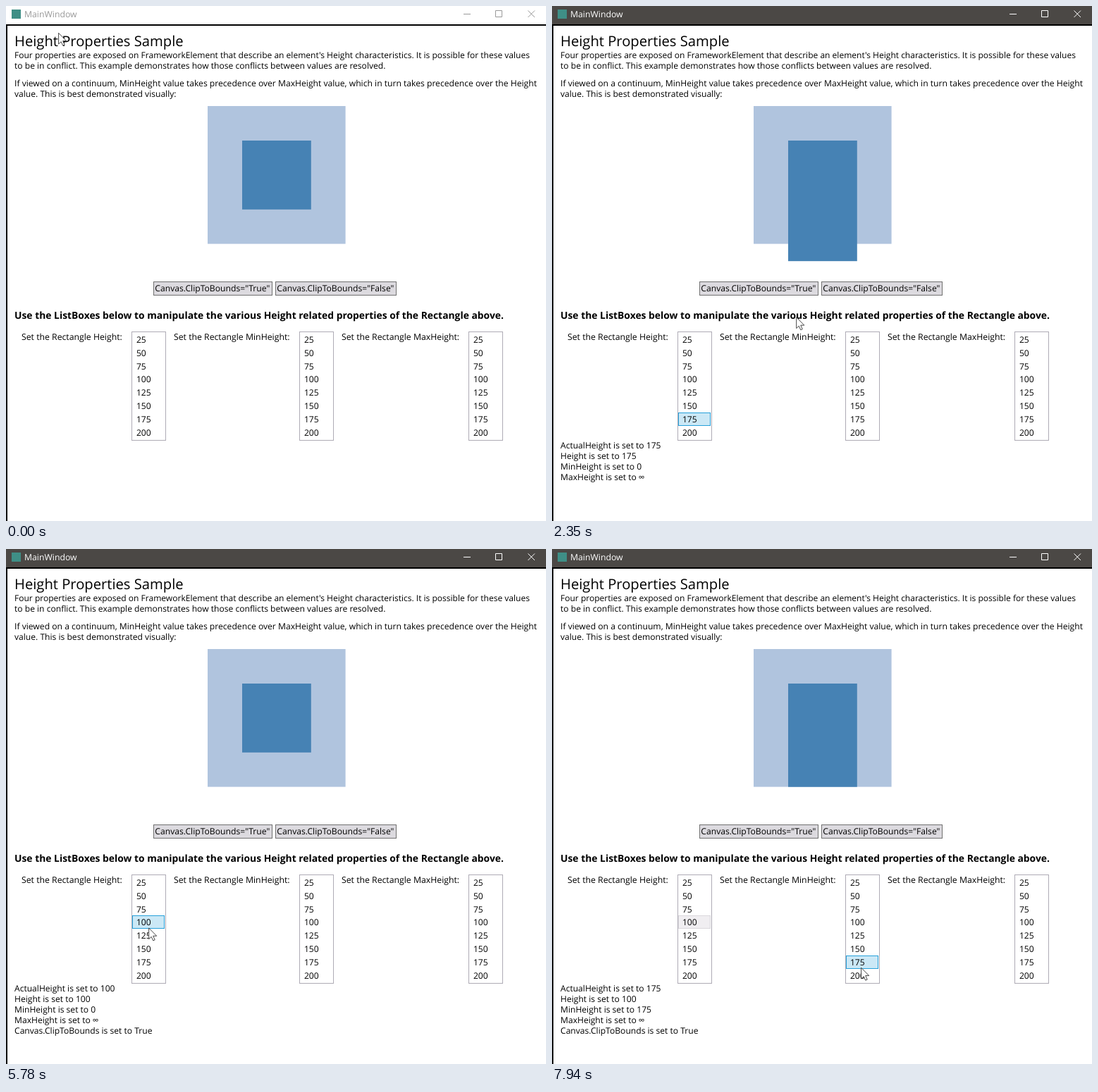
Recreate the animation shown at these times as an HTML page. Size 766 px wide and 731 px high, loop 8000 ms.

```html
<!DOCTYPE html>
<html lang="en">
<head>
<meta charset="utf-8">
<title>Height properties demo</title>
<style>
  html, body { margin: 0; width: 100%; height: 100%; overflow: hidden; background: #fff; }
  svg { display: block; width: 100vw; height: 100vh; }
  text { font-family: "Open Sans", "Noto Sans", sans-serif; text-rendering: geometricPrecision; white-space: pre; }
</style>
</head>
<body>
<svg id="stage" viewBox="0 0 766 731"></svg>
<script>
const LOOP = 8000;
const STEP = 98.25;   // time between screen updates
const SCALE = 0.978;  // screen pixels per layout unit
const ROW = 18.86;
const LIST_TOP = 464.5;
const VALUES = Array.from({ length: 8 }, (_, i) => 25 * (i + 1));
const CLIP_OFF = 3040, CLIP_ON = 3910;

const LISTS = [
  { x: 178.5, labelX: 22, name: "Height" },
  { x: 416.5, labelX: 238, name: "MinHeight" },
  { x: 656.5, labelX: 476, name: "MaxHeight" }
];

// Pointer strokes; a stroke with a list drags through that list and selects.
const START = { x: 75, y: 38 };
const STROKES = [
  { from: 30, to: 780, x: 205, y: 471 },
  { from: 780, to: 1950, x: 208, y: 589, list: 0 },
  { from: 2050, to: 2600, x: 472, y: 399 },
  { from: 3140, to: 3510, x: 351, y: 396 },
  { from: 4900, to: 5480, x: 206, y: 471 },
  { from: 5480, to: 5780, x: 203, y: 538, list: 0 },
  { from: 6200, to: 6850, x: 446, y: 471 },
  { from: 6850, to: 7940, x: 439, y: 594, list: 1 }
];

const lerp = (a, b, k) => a + (b - a) * k;
const easeOut = k => 1 - (1 - k) ** 2;

function stateAt(t) {
  const rows = [-1, -1, -1];
  let pointer = START, focus = -1;
  for (const s of STROKES.filter(s => s.from <= t)) {
    const k = Math.min(1, (t - s.from) / (s.to - s.from));
    const dragging = s.list !== undefined;
    pointer = {
      x: lerp(pointer.x, s.x, k),
      y: lerp(pointer.y, s.y, dragging ? k : easeOut(k))
    };
    if (dragging) {
      rows[s.list] = Math.max(0, Math.floor((pointer.y - LIST_TOP) / ROW));
      focus = s.from < CLIP_OFF && t >= CLIP_OFF ? -1 : s.list;
    }
  }
  const height = VALUES[rows[0]] ?? 100;
  const min = VALUES[rows[1]] ?? 0;
  return {
    rows, pointer, focus, height, min,
    actual: Math.max(height, min),
    clip: t < CLIP_OFF ? "" : t < CLIP_ON ? "False" : "True",
    active: rows[0] >= 0
  };
}

const text = (x, y, str, size = 12.1, extra = "") =>
  `<text x="${x}" y="${y}" font-size="${size}" ${extra}>${str}</text>`;
const rect = (x, y, w, h, fill, stroke = "none") =>
  `<rect x="${x}" y="${y}" width="${w}" height="${h}" fill="${fill}" stroke="${stroke}"/>`;

function titleBar({ active }) {
  const ink = active ? "#fff" : "#999";
  return rect(0, 0, 766, 27, active ? "#4b4845" : "#fff") +
    rect(0, 26, 766, 2, "#000") + rect(0, 26, 2, 705, "#000") +
    rect(8, 5, 13, 13, "#3f8f86") +
    text(26, 16, "MainWindow", 12.25, `fill="${ink}"`) +
    `<path d="M649 11.5h10M694.5 6.5h9v9h-9zM740.5 6.5l9.5 9.5m0-9.5l-9.5 9.5" fill="none" stroke="${ink}"/>`;
}

const INTRO =
  text(12, 57, "Height Properties Sample", 20.2) +
  text(12, 74, "Four properties are exposed on FrameworkElement that describe an element's Height characteristics. It is possible for these values", 12.04) +
  text(12, 89, "to be in conflict. This example demonstrates how those conflicts between values are resolved.") +
  text(12, 114, "If viewed on a continuum, MinHeight value takes precedence over MaxHeight value, which in turn takes precedence over the Height", 12.15) +
  text(12, 129, "value. This is best demonstrated visually:") +
  text(12, 443.5, "Use the ListBoxes below to manipulate the various Height related properties of the Rectangle above.", 13.86, 'font-weight="700"');

function shapes({ actual, clip }) {
  const shown = clip === "True" ? Math.min(actual, 150) : actual;
  return rect(286, 142, 200 * SCALE, 200 * SCALE, "#b0c4de") +
    rect(335, 191, 100 * SCALE, shown * SCALE, "#4682b4");
}

function button(x, w, value, { pointer }) {
  const hover = pointer.x >= x && pointer.x <= x + w && pointer.y >= 391 && pointer.y <= 410;
  return rect(x, 391.5, w, 19, hover ? "#bee6fd" : "#dcdadf", hover ? "#3c7fb1" : "#707070") +
    text(x + 1.8, 405, `Canvas.ClipToBounds="${value}"`, 12.15);
}

function listBox({ x, labelX, name }, row, focused) {
  const mark = row < 0 ? "" : rect(x + 1, Math.round(LIST_TOP + row * ROW) - 0.5, 45, 18,
    focused ? "#cbe8f6" : "#f0eef1", focused ? "#26a0da" : "#dad8dc");
  return text(labelX, 474, `Set the Rectangle ${name}:`, 12.27) +
    rect(x, 462.5, 48, 154, "#fff", "#aeabb5") + mark +
    VALUES.map((v, i) => text(x + 6.4, 477.8 + i * ROW, v)).join("");
}

function status({ active, actual, height, min, clip }) {
  if (!active) return "";
  const values = { ActualHeight: actual, Height: height, MinHeight: min, MaxHeight: "∞" };
  if (clip) values["Canvas.ClipToBounds"] = clip;
  return Object.entries(values)
    .map(([name, v], i) => text(12, 628 + i * 15, `${name} is set to ${v}`)).join("");
}

const cursor = ({ x, y }) =>
  `<path transform="translate(${x - 0.7} ${y})" d="M.3.3V16L3.9 12.7 6.4 18.2 8.9 17.1 6.4 11.6H11.4Z" fill="#fff" stroke="#333" stroke-width=".9"/>`;

const stage = document.getElementById("stage");
let drawn;

function draw(t) {
  const s = stateAt(t);
  stage.innerHTML = rect(0, 0, 766, 731, "#fff") + titleBar(s) + INTRO + shapes(s) +
    button(209.5, 168, "True", s) + button(382.5, 171, "False", s) +
    LISTS.map((list, i) => listBox(list, s.rows[i], s.focus === i)).join("") +
    status(s) + cursor(s.pointer);
}

function tick() {
  const step = Math.floor((performance.now() % LOOP - 70) / STEP);
  if (step !== drawn) {
    drawn = step;
    draw(step < 0 ? 0 : 80 + step * STEP);
  }
  requestAnimationFrame(tick);
}
tick();
</script>
</body>
</html>
```
